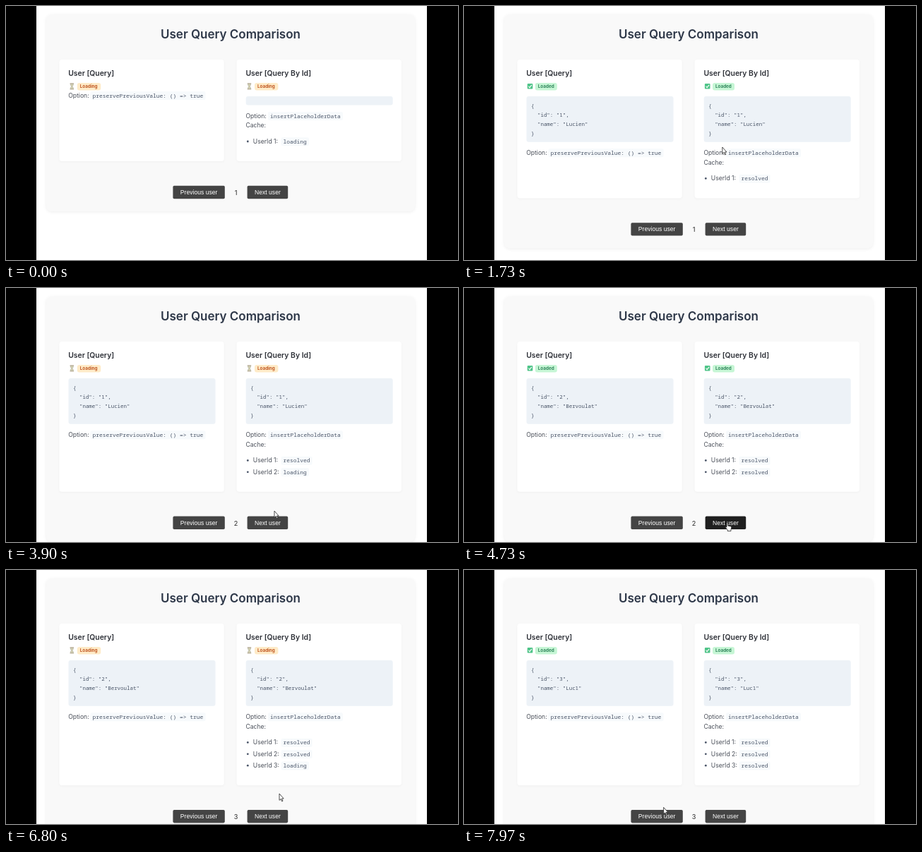
An HTML page that plays this animation: 640x360 px, repeating every 8000 ms.

```html
<!DOCTYPE html>
<html lang="en">
<head>
<meta charset="utf-8">
<title>User Query Comparison</title>
<style>
  html, body { margin: 0; width: 100%; height: 100%; overflow: hidden; background: #fff; }
  svg { display: block; width: 100vw; height: 100vh; }
  text { font-family: Inter, "Open Sans", sans-serif; white-space: pre; }
  .title { font-size: 17px; font-weight: 600; fill: #2d3748; text-anchor: middle; }
  .heading { font-size: 10.4px; font-weight: 600; fill: #2e3138; }
  .badge { font-size: 6.3px; font-weight: 700; }
  .body { font-size: 8.6px; fill: #4a4f59; }
  .code, .json { font-family: "Noto Sans Mono", "DejaVu Sans Mono", monospace; fill: #4a5568; }
  .code { font-size: 7.93px; }
  .json { font-size: 7.46px; }
  .button { font: 8.6px "Liberation Sans", Arial, sans-serif; fill: #fff; text-anchor: middle; }
  .page { font-size: 9px; font-weight: 500; fill: #444; text-anchor: middle; }
  .panel { filter: drop-shadow(0 1px 2px rgba(0, 0, 0, .07)); }
  .card { filter: drop-shadow(0 1px 1.5px rgba(0, 0, 0, .035)); }
</style>
</head>
<body>
<svg viewBox="0 0 640 360" xmlns="http://www.w3.org/2000/svg">
  <g id="app"></g>
  <g id="ring" fill="none">
    <circle r="12" fill="#fff" fill-opacity=".55" stroke="#a9c2f5" stroke-width="1.5"/>
    <circle r="7.6" fill="#e8effd" stroke="#5f8fee" stroke-width="3"/>
    <circle r="2.4" fill="#6d97e8"/>
  </g>
  <g id="cursor" stroke="#222" stroke-width=".8" stroke-linejoin="round" fill="#fff">
    <path id="arrow" d="M0 0V9.4L2.1 7.5 3.6 10.9 5 10.3 3.5 7H6.2Z"/>
    <path id="hand" d="M-.7 .3Q.2-.8 1.1 .3V4.6L4.8 5.4Q6 5.8 6 7L5.3 10.2V12H.4V10.4L-2.2 7.2Q-2.4 6-1.4 6.1L-.7 6.8Z"/>
  </g>
  <path d="M0 0H43V360H0ZM596 0H640V360H596Z"/>
</svg>
<script>
const LOOP = 8000;
const USERS = ["Lucien", "Bervoulat", "Luc1"];
const LOADED_AT = [870, 4370, 7530];
const CLICKS = [{ at: 2370, x: 357, y: 315 }, { at: 5530, x: 372, y: 334 }];
const HOVERS = [[2050, 2480], [4720, 5660], [6150, 6300]];
const CODE_ADVANCE = 7.93 * 0.6;
const LINE = 16.4;
const PRE_HEIGHT = 52.4;

// Pointer stops: time, x, y
const PATH = [
  [1230, 381, 2], [2080, 357, 315], [3070, 357, 315], [3300, 345, 303],
  [3600, 367, 321], [3870, 380, 316], [4150, 380, 316], [4860, 372, 334],
  [6030, 372, 334], [6220, 377, 343], [6630, 387, 318], [6800, 387, 317],
  [7000, 387, 317], [7800, 301, 326], [7980, 282.5, 336.5]
];

const $ = id => document.getElementById(id);
const clamp = v => Math.max(0, Math.min(1, v));
const smooth = v => v * v * (3 - 2 * v);

const text = (cls, x, y, str, extra = "") =>
  `<text class="${cls}" x="${x}" y="${y}" ${extra}>${str.replace(/>/g, "&gt;")}</text>`;
const rect = (x, y, w, h, r, fill, cls = "") =>
  `<rect class="${cls}" x="${x}" y="${y}" width="${w}" height="${h}" rx="${r}" fill="${fill}"/>`;

function inlineCode(x, y, str) {
  return rect(x - 3, y - 8.7, str.length * CODE_ADVANCE + 6, 12, 2, "#f7fafc") + text("code", x, y, str);
}

function status(x, loaded) {
  const icon = loaded
    ? rect(x + 1.5, 110, 7.6, 7.6, 1, "#4fc488") +
      `<path d="M${x + 3.2} 113.9l1.6 1.8 2.8-3.8" fill="none" stroke="#fff" stroke-width="1.1"/>`
    : `<path d="M${x + 2.4} 110h5.4M${x + 2.4} 117.8h5.4" stroke="#a08a68" stroke-width="1"/>` +
      `<path d="M${x + 3} 110.4h4.2q0 2.2-1.5 3.5 1.5 1.3 1.5 3.5h-4.2q0-2.2 1.5-3.5-1.5-1.3-1.5-3.5z" fill="#d3cfaf" stroke="#a9aa9a" stroke-width=".6"/>`;
  const [label, width, back, ink] = loaded
    ? ["Loaded", 31, "#c6f6d5", "#2f855a"]
    : ["Loading", 33.4, "#feebc8", "#c05621"];
  return icon + rect(x + 12.6, 108.9, width, 10.6, 3, back) +
    text("badge", x + 16.6, 116.4, label, `fill="${ink}"`);
}

function card(x, title, height, loaded, user) {
  let out = rect(x - 12.8, 76, 233.4, height, 4, "#fff", "card") +
    text("heading", x, 99.2, title) + status(x, loaded);
  if (user) {
    out += rect(x + .3, 128, 208, 64.8, 3, "#edf2f7");
    ["{", `  "id": "${user}",`, `  "name": "${USERS[user - 1]}"`, "}"]
      .forEach((line, i) => out += text("json", x + 6.8, 143.6 + i * 13.2, line));
  }
  return out;
}

function button(x, y, width, label, hover) {
  return rect(x, y, width, 18.4, 1.8, hover ? "#1f1f1f" : "#444") +
    text("button", x + width / 2, y + 12, label);
}

function renderApp(page, loaded, user, hover) {
  const shift = (page - 1) * LINE + (user ? PRE_HEIGHT : 0);
  const top = user ? 211 : 211 - PRE_HEIGHT;
  const height = 144 + shift;
  const buttonY = 254.8 + shift;
  const leftY = user ? 211 : 129.6;

  let out = rect(57, 12, 522, 279 + shift, 8, "#f9f9f9", "panel") +
    text("title", 318, 46, "User Query Comparison") +
    card(88.2, "User [Query]", height, loaded, user) +
    text("body", 88.2, leftY, "Option:") +
    inlineCode(122.5, leftY, "preservePreviousValue: () => true") +
    card(339.4, "User [Query By Id]", height, loaded, user);

  if (!user) out += rect(339.7, 128, 208, 12.5, 3, "#edf2f7");
  out += text("body", 339.4, top, "Option:") +
    inlineCode(374, top, "insertPlaceholderData") +
    text("body", 339.4, top + 13.8, "Cache:");

  for (let id = 1; id <= page; id++) {
    const y = top + 36.4 + (id - 1) * LINE;
    out += `<circle cx="342.3" cy="${y - 3}" r="1.4" fill="#4a5568"/>` +
      text("body", 349.8, y, `UserId ${id}:`) +
      inlineCode(392.6, y, id < page || loaded ? "resolved" : "loading");
  }
  return out + button(236.4, buttonY, 73.4, "Previous user", false) +
    text("page", 325.6, buttonY + 13, String(page)) +
    button(341.6, buttonY, 57.6, "Next user", hover);
}

function pointerAt(t) {
  const next = PATH.findIndex(p => p[0] > t);
  if (next < 0) return PATH[PATH.length - 1].slice(1);
  const [t0, x0, y0] = PATH[next - 1];
  const [t1, x1, y1] = PATH[next];
  const k = smooth((t - t0) / (t1 - t0));
  return [x0 + (x1 - x0) * k, y0 + (y1 - y0) * k];
}

let lastState = "";
function draw(t) {
  const page = 1 + CLICKS.filter(c => t >= c.at).length;
  const user = LOADED_AT.filter(at => t >= at).length;
  const hover = HOVERS.some(([from, to]) => t >= from && t < to);
  const state = [page, user, hover].join();
  if (state !== lastState) {
    $("app").innerHTML = renderApp(page, user === page, user, hover);
    lastState = state;
  }

  const click = CLICKS.find(c => t >= c.at && t < c.at + 140);
  $("ring").setAttribute("opacity", click ? 1 - clamp((t - click.at - 60) / 80) : 0);
  if (click) $("ring").setAttribute("transform", `translate(${click.x} ${click.y})`);

  const visible = t >= PATH[0][0];
  $("cursor").setAttribute("visibility", visible ? "visible" : "hidden");
  if (visible) {
    $("cursor").setAttribute("transform", `translate(${pointerAt(t).join(" ")})`);
    $("hand").setAttribute("display", hover ? "inline" : "none");
    $("arrow").setAttribute("display", hover ? "none" : "inline");
  }
}

function tick() {
  draw(performance.now() % LOOP);
  requestAnimationFrame(tick);
}
tick();
</script>
</body>
</html>
```
